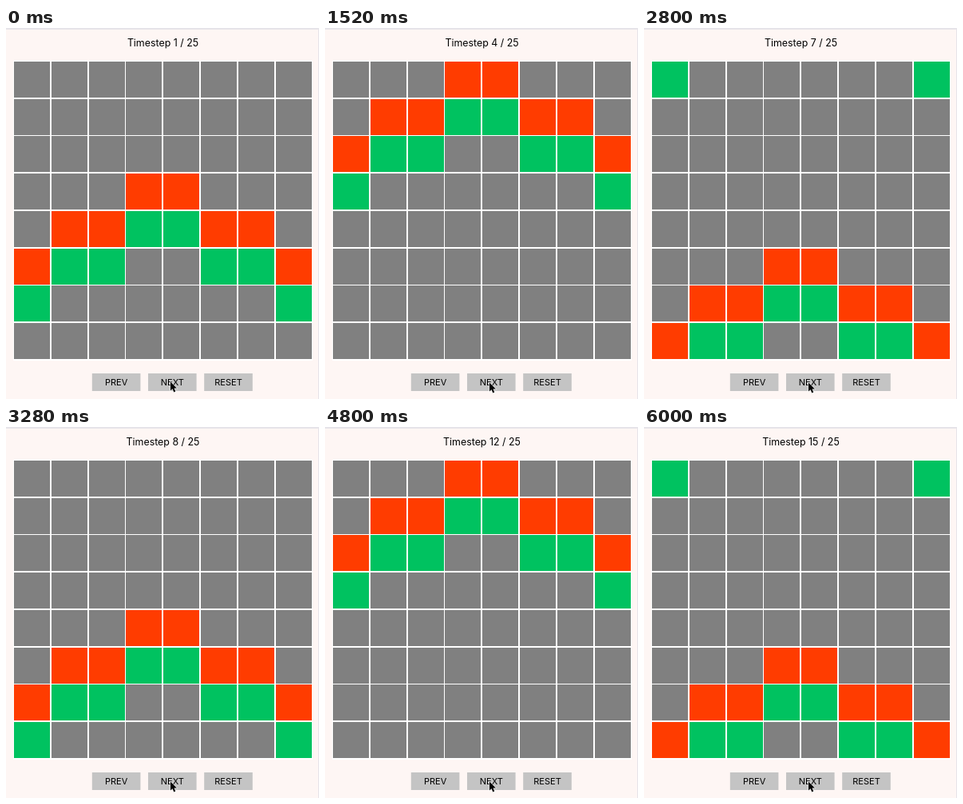
Animation of 392x464 px, one loop 6.32 s. Source, as an HTML page:

```html
<!DOCTYPE html>
<html lang="en">
<head>
<meta charset="utf-8">
<title>Timestep viewer</title>
<style>
  html, body { margin: 0; width: 100%; height: 100%; overflow: hidden; background: #fef6f4; }
  svg { display: block; }
  text { font-family: Inter, Roboto, sans-serif; text-anchor: middle; }
  .title { font-size: 12.4px; }
  .label { font-size: 11px; }
</style>
</head>
<body>
<svg id="stage" width="392" height="464" viewBox="0 0 392 464">
  <path fill="#e6e4e9" d="M0 0H392V464H391V2H0Z"/>
  <text id="title" class="title" x="196.5" y="22.5"></text>
  <rect x="9" y="41" width="375" height="375" fill="#fff"/>
  <g id="cells" shape-rendering="crispEdges"></g>
  <g id="buttons"></g>
  <path id="cursor" d="M0 0V12L2.7 9.5L4.7 14L6.8 13.1L4.9 8.8H8.5Z"
        stroke="#fff" stroke-width="1.2" stroke-opacity=".8" paint-order="stroke"/>
</svg>
<script>
const LOOP = 6320, SIZE = 8, PITCH = 46.8;
const COLORS = { r: '#ff3c00', g: '#00c260', '.': '#808080' };
// The arch, from its top row down; it climbs one row per step and wraps.
const ARCH = ['...rr...', '.rrggrr.', 'rgg..ggr', 'g......g'];
const STEP_TIMES = [720, 1040, 1520, 2000, 2480, 2800, 3120, 3600, 3920, 4480, 4800, 5120, 5600, 5920];

const byId = id => document.getElementById(id);

function add(parent, tag, attrs) {
  const el = document.createElementNS('http://www.w3.org/2000/svg', tag);
  for (const key in attrs) el.setAttribute(key, attrs[key]);
  return parent.appendChild(el);
}

const cells = Array.from({ length: SIZE * SIZE }, (_, i) => add(byId('cells'), 'rect', {
  x: Math.round(10 + i % SIZE * PITCH),
  y: Math.round(42 + Math.floor(i / SIZE) * PITCH - 0.3),
  width: 45, height: 45
}));

['PREV', 'NEXT', 'RESET'].forEach((name, i) => {
  const x = 107.8 + i * 70.2;
  add(byId('buttons'), 'rect', { x, y: 432, width: 60.6, height: 22, fill: '#c4c4c4' });
  add(byId('buttons'), 'text', { class: 'label', x: x + 30.3, y: 447 }).textContent = name;
});

let shown = 0;
function showStep(step) {
  if (step === shown) return;
  shown = step;
  byId('title').textContent = `Timestep ${step} / 25`;
  cells.forEach((cell, i) => {
    const row = (Math.floor(i / SIZE) + step + 4) % SIZE;
    cell.setAttribute('fill', COLORS[ARCH[row]?.[i % SIZE] ?? '.']);
  });
}

function draw(now) {
  const t = now % LOOP;
  showStep(1 + STEP_TIMES.filter(at => t >= at).length);
  const y = 442.5 + (t >= 240) * 0.5 + (t >= 480) * 0.5;
  byId('cursor').setAttribute('transform', `translate(206 ${y}) scale(.92)`);
  requestAnimationFrame(draw);
}
draw(performance.now());
</script>
</body>
</html>
```
